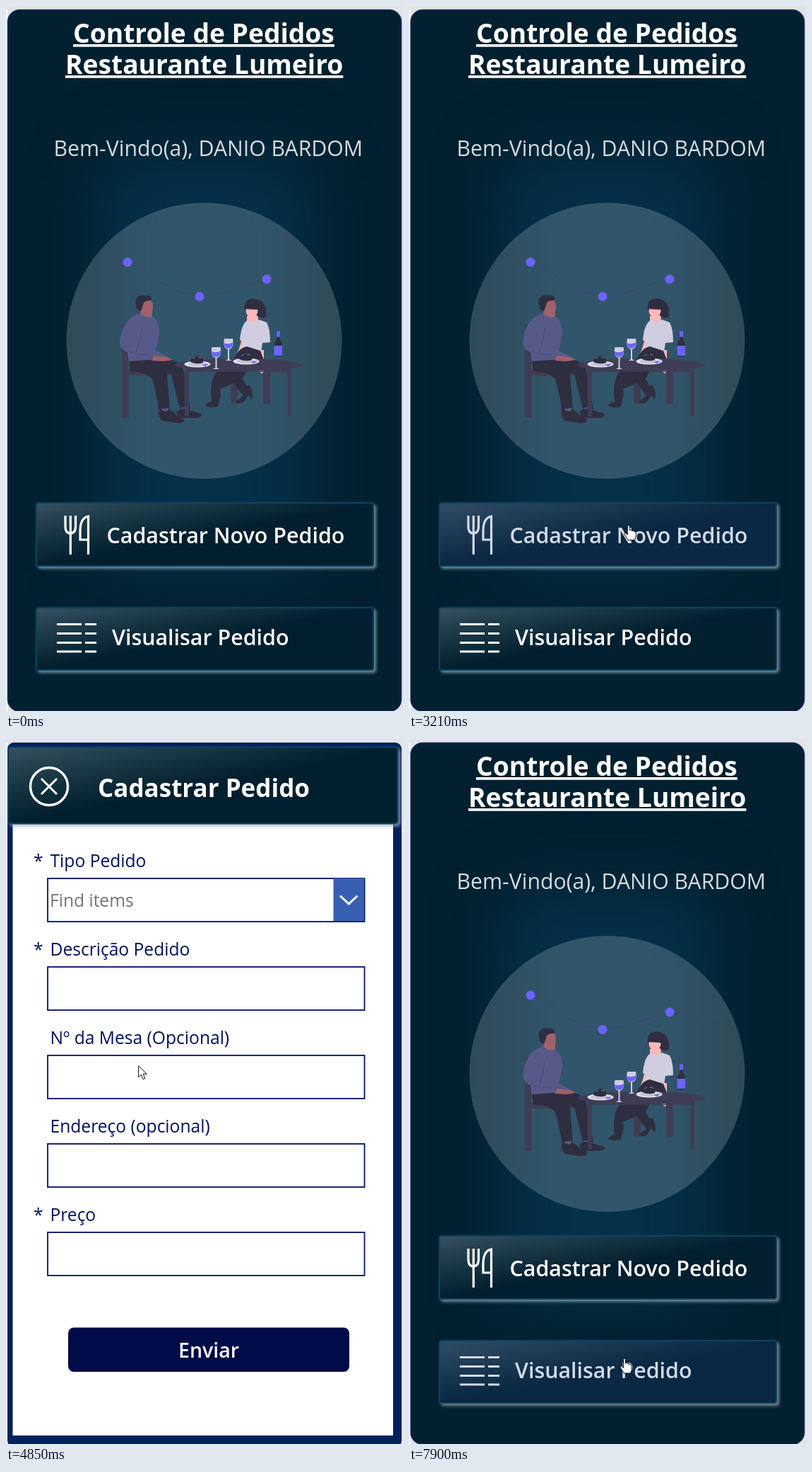
Recreate the animation shown at these times as an HTML page. Size 562x996 px, loop 8 s.

```html
<!DOCTYPE html>
<html lang="pt-BR">
<head>
<meta charset="utf-8">
<title>Controle de Pedidos</title>
<style>
  html, body { margin: 0; width: 100%; height: 100%; overflow: hidden; background: #e2e3e5; }
  svg { display: block; width: 562px; height: 996px; }
  text { font-family: "Open Sans", "Noto Sans", sans-serif; }
  .title { font-size: 37.2px; font-weight: 700; fill: #fff; text-decoration: underline; }
  .button { fill: #fff; stroke: #fff; }
  .button text { font-size: 30.4px; font-weight: 600; stroke: none; }
  .button path { fill: none; stroke-width: 3.2; }
  .panel { fill: url(#idle); stroke: #0a4362; stroke-width: 2; filter: drop-shadow(3px 3px 2px #9aabb3c0); }
  .over { fill: #d2dae6; stroke: #d2dae6; }
  .over .panel { fill: url(#over); }
  .pressed { fill: #b1b9bd; stroke: #b1b9bd; }
  .pressed .panel { fill: url(#pressed); stroke: #3b5767; }
  .label { font-size: 24.6px; fill: #00115f; }
  .close { fill: none; stroke: #fff; stroke-width: 3.4; }
  .close.over { stroke: #dadde0; }
  .close.pressed { stroke: #c6c8ca; }
  .ink { fill: #2f2e41; }
  .wood { fill: #3f3d56; }
  .violet { fill: #6c63ff; }
  .pale { fill: #d0cde1; }
</style>
</head>
<body>
<svg viewBox="0 0 562 996">
  <defs>
    <linearGradient id="idle" x2="1" y2="1"><stop stop-color="#36515f"/><stop offset=".25" stop-color="#1a3745"/><stop offset=".5" stop-color="#021f2f"/></linearGradient>
    <linearGradient id="over" x2="1" y2="1"><stop stop-color="#314d67"/><stop offset=".5" stop-color="#0a2743"/></linearGradient>
    <linearGradient id="pressed" x2="1" y2="1"><stop stop-color="#536d79"/><stop offset=".5" stop-color="#344d5a"/></linearGradient>
  </defs>
  <path d="M0 5h2v991h-2z" fill="#fff"/>

  <g id="home">
    <rect x="2.5" y="5.5" width="557" height="991" rx="17" fill="#02202f" stroke="#0b2860" stroke-width="1.5"/>
    <rect x="135" y="215" width="291" height="585" fill="#04304a" style="filter: blur(46px)"/>
    <text class="title" x="95" y="52">Controle de Pedidos</text>
    <text class="title" x="84" y="96">Restaurante Lumeiro</text>
    <text x="67.5" y="212" font-size="30.2" fill="#d6dbdf">Bem-Vindo(a), DANIO BARDOM</text>

    <circle cx="280.5" cy="473" r="195" fill="#fff" fill-opacity=".18"/>
    <path d="M143 366Q160 358 172 362C200 368 225 407 274 409C315 410 345 388 369 387C395 388 410 394 440 393" fill="none" stroke="#3b4c61" stroke-width="1.3"/>
    <g class="violet"><circle cx="172" cy="362" r="6.5"/><circle cx="274" cy="410.5" r="6.5"/><circle cx="369" cy="386" r="6.5"/></g>

    <!-- chairs -->
    <path class="wood" d="M164 450h9v64h67v8h-19v60h-6v-60h-41v60h-10zM318 512h10v50h-10zM364 512h10v50h-10z"/>
    <!-- man -->
    <path class="ink" d="M174 500L205 494L235 500Q250 505 252 518L261 570L247 573L234 520L228 518L232 573L218 574L208 530Q204 518 176 516Z"/>
    <path d="M220 569l10-1v7h-9zM247 568l10-2 2 6-10 2z" fill="#575a89"/>
    <path class="ink" d="M216 575Q218 568 226 573Q234 568 239 576L252 584Q253 590 241 589L220 586ZM241 574Q249 566 257 570L276 576Q279 581 268 582L246 582Z"/>
    <path d="M190 428L208 424L206 443L191 441Z" fill="#a0616a"/>
    <ellipse cx="200" cy="424" rx="8" ry="11" fill="#a0616a"/>
    <path class="ink" d="M184 422C181 411 190 407 197 409Q207 407 206 416Q194 415 194 423L191 431Q184 430 184 422Z"/>
    <path d="M189 434Q199 442 208 439Q218 447 217 465L212 487L229 495L226 501L201 500L174 502L172 489Q158 483 162 469Q166 442 189 434Z" fill="#575a89"/>
    <path d="M173 487Q184 494 202 492M192 455Q190 475 184 490" fill="none" stroke="#494b76"/>
    <path d="M209 494l20 2 7 4-13 2-16-1z" fill="#a0616a"/>
    <!-- woman -->
    <path d="M341 438L356 434L358 452L341 451ZM334 470L330 484L324 498L330 499L341 480ZM358 486L359 516Q362 522 365 516L365 486Z" fill="#ffb8b8"/>
    <path class="ink" d="M338 430C336 416 344 412 354 414C368 416 369 430 368 439Q361 443 354 436Z"/>
    <ellipse cx="348" cy="430" rx="8.5" ry="10" fill="#ffb8b8"/>
    <path class="ink" d="M338 428Q338 413 354 414L360 432L356 429Z"/>
    <path class="pale" d="M342 444Q353 449 358 443L369 447Q374 456 374 475L363 476L361 489L333 488L336 474L331 472Q333 449 342 444Z"/>
    <path class="ink" d="M322 500Q329 483 341 481L360 487L365 500ZM299 515L342 514L334 528L303 541L304 551L291 547Q288 530 299 515ZM317 525L332 522L344 542L333 547Z"/>
    <path class="ink" d="M290 543L304 548L300 566Q290 569 282 565Q284 560 291 559ZM332 543L344 535Q351 545 348 556L343 550L337 559Q329 564 325 559L336 551Z"/>
    <!-- table -->
    <ellipse class="wood" cx="329" cy="507" rx="90" ry="9"/>
    <path class="wood" d="M253 508h6v72h-6zM398 508h6v72h-6zM259 512Q328 521 398 512V517H259z"/>
    <g id="plate">
      <ellipse cx="271" cy="506" rx="18.5" ry="4.5" fill="#e4e4ea"/>
      <ellipse cx="271" cy="506" rx="14" ry="3" fill="#c6c5d4"/>
      <path class="ink" d="M261 503Q261 498 265 496Q271 492 277 496Q280 499 279 504Q270 507 261 503Z"/>
      <path class="violet" d="M277 507l11-2-6 4z"/>
      <path d="M264 498l4-2m4 0l5 1" stroke="#8583a0"/>
    </g>
    <use href="#plate" x="69" y="-4"/>
    <g id="glass">
      <path class="pale" d="M291.5 482H303.5Q306 495 298.5 497V511L302 513H293L296.5 511V497Q289 495 291.5 482Z"/>
      <path class="violet" d="M291 488Q297 491 304 487Q304 495 297.5 496Q291 495 291 488Z"/>
    </g>
    <use href="#glass" x="17.5" y="-12"/>
    <path class="ink" d="M383 466h5v6q3 3 3 7v16h-11.5v-16q0-4 3.5-7z"/>
    <path class="violet" d="M383 459.5h5v8h-5zM379.5 480h11.5v14h-11.5z"/>

    <g class="button" id="create">
      <rect class="panel" x="43" y="702" width="477" height="89" rx="3"/>
      <path d="M84 720V735Q84 745 91 745Q98.5 745 98.5 735V720M91.3 720V775M116.5 775V721Q105 723 105 742V754H116.5"/>
      <text x="142.5" y="759">Cadastrar Novo Pedido</text>
    </g>
    <g class="button" id="view">
      <rect class="panel" x="43" y="850" width="477" height="88" rx="3"/>
      <path d="M72 873.5h35m5 0h16M72 886.5h35m5 0h16M72 899.5h35m5 0h16M72 912h35m5 0h16"/>
      <text x="150" y="903">Visualisar Pedido</text>
    </g>
  </g>

  <g id="form">
    <rect x="2" y="5" width="558" height="995" rx="9" fill="#00215e"/>
    <path d="M9.5 100H548V984H9.5z" fill="#fff"/>
    <rect class="panel" x="3" y="11.5" width="551.5" height="108" rx="4"/>
    <g class="close" id="close"><circle cx="61" cy="67" r="26.5"/><path d="M50 56L72 78M72 56L50 78" stroke-width="3"/></g>
    <text x="130" y="82" font-size="35" font-weight="700" fill="#fff">Cadastrar Pedido</text>
    <g id="fields"></g>
    <text x="62" y="237" font-size="24.6" fill="#767676">Find items</text>
    <path d="M463.5 197H507V257H463.5z" fill="#3860b2"/>
    <path d="M473 221.5L485.3 233L497.5 221.5" fill="none" stroke="#fff" stroke-width="3"/>
    <rect x="88" y="831.5" width="398" height="62.5" rx="8" fill="#000b47"/>
    <text x="287" y="874" font-size="28.5" font-weight="600" fill="#fff" text-anchor="middle">Enviar</text>
  </g>

  <g id="cursor" stroke="#111" stroke-width="1" stroke-linejoin="round">
    <path id="arrow" fill="#fff" d="M0 0V16L3.7 12.5L6.5 19L9.3 17.8L6.5 11.5H11.5Z"/>
    <path id="hand" fill="#fff" d="M-1.5 1.5Q0 -1.5 1.5 1.5V7Q4 5.5 5 8Q7.5 7 8 9Q10.5 8.5 10.5 11V15Q10 18 8.5 21H-.5Q-3 17 -6 13Q-6 10 -3.5 11.5L-1.5 13.5Z"/>
    <path id="beam" fill="none" stroke="#333" d="M-3 -8H-1L0 -7L1 -8H3M0 -7V7M-3 8H-1L0 7L1 8H3"/>
  </g>
</svg>

<script>
const LOOP = 8000, HOVER_LAG = 70;
const FORM_OPEN = 4150, FORM_CLOSED = 6670;
const $ = id => document.getElementById(id);

const labels = ['*Tipo Pedido', '*Descrição Pedido', 'Nº da Mesa (Opcional)', 'Endereço (opcional)', '*Preço'];
$('fields').innerHTML = labels.map((label, i) => {
  const y = 181 + i * 125;
  const star = label[0] === '*' ? `<text class="label" x="39" y="${y}">*</text>` : '';
  return `${star}<text class="label" x="62.5" y="${y}">${label.replace('*', '')}</text>
    <rect x="59" y="${y + 16}" width="448.5" height="61" fill="#fff" stroke="#00126b" stroke-width="1.8"/>`;
}).join('');

// Pointer track: time, x, y
const track = [
  [1050, 546, 990], [1110, 530, 984], [1180, 522, 982], [1440, 522, 982],
  [1510, 490, 948], [1580, 425, 892], [1650, 348, 829], [1720, 320, 786],
  [1930, 312, 750], [2190, 312, 750], [2330, 318, 600], [2460, 328, 487],
  [2600, 323, 545], [2940, 314, 686], [3010, 313, 694], [3280, 310, 747],
  [4630, 310, 747], [4710, 280, 660], [4780, 232, 560], [4850, 188, 463],
  [5060, 105, 200], [5320, 62, 52], [5590, 62, 52], [5660, 68, 59],
  [7280, 68, 62], [7420, 150, 340], [7560, 255, 720], [7700, 305, 859],
  [7830, 305, 859], [7900, 305, 875]
];

function pointerAt(t) {
  const i = track.findIndex(key => key[0] > t);
  if (i < 1) return (i ? track.at(-1) : track[0]).slice(1);
  const [t0, x0, y0] = track[i - 1], [t1, x1, y1] = track[i];
  const k = (t - t0) / (t1 - t0);
  return [x0 + (x1 - x0) * k, y0 + (y1 - y0) * k];
}

const zones = { create: [42, 701, 521, 792], view: [42, 849, 521, 939], close: [33, 39, 89, 95] };
const inside = (id, [x, y]) => {
  const [left, top, right, bottom] = zones[id];
  return x > left && x < right && y > top && y < bottom;
};
const show = (id, visible) => $(id).style.display = visible ? '' : 'none';

function draw(t) {
  const onForm = t >= FORM_OPEN && t < FORM_CLOSED;
  const pointer = pointerAt(t), lagged = pointerAt(t - HOVER_LAG);
  const pressed = { create: t >= 3610 && t < FORM_OPEN, close: t >= 6390 && t < FORM_CLOSED };
  // The pointer waits outside the view until its first move
  const active = t >= track[0][0];
  for (const id in zones) {
    const state = pressed[id] ? 'pressed' : active && inside(id, lagged) ? 'over' : '';
    $(id).setAttribute('class', `${id === 'close' ? 'close' : 'button'} ${state}`);
  }
  show('home', !onForm);
  show('form', onForm);

  const beam = t >= 3750 && t < 4630;
  const hand = !beam && !onForm && (inside('create', pointer) || inside('view', pointer));
  show('beam', beam);
  show('hand', hand);
  show('arrow', !beam && !hand);
  show('cursor', active);
  $('cursor').setAttribute('transform', `translate(${pointer})`);
}

function tick() {
  draw(performance.now() % LOOP);
  requestAnimationFrame(tick);
}
tick();
</script>
</body>
</html>
```
